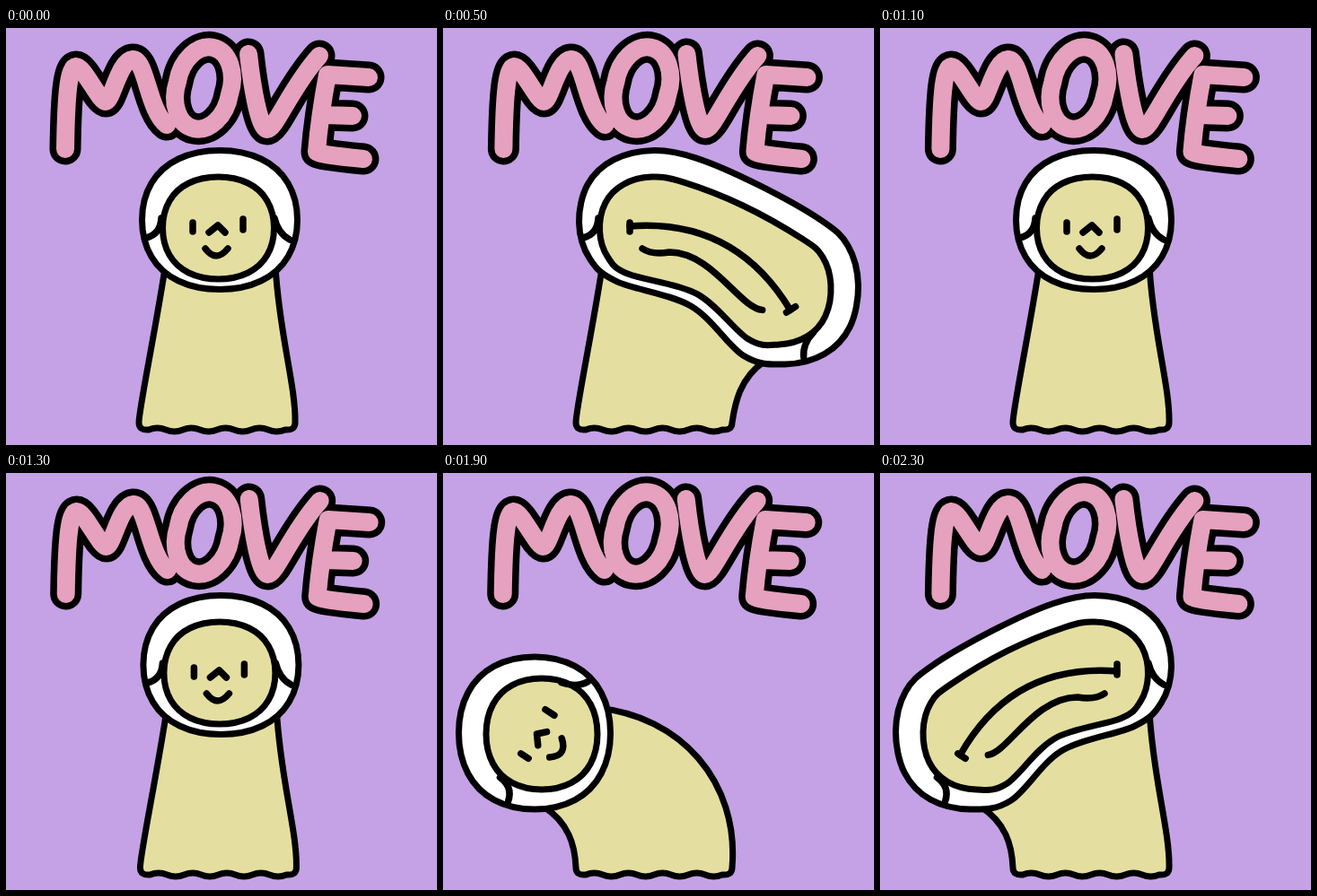
Recreate the animation shown at these times as an HTML page. Size 480 px wide and 465 px high, loop 2.4 s.

```html
<!DOCTYPE html>
<html lang="en">
<head>
<meta charset="utf-8">
<title>Move</title>
<style>
  html, body { margin: 0; width: 100%; height: 100%; overflow: hidden; background: #c4a2e5; }
  svg { display: block; width: 100vw; height: 100vh; }
  path { fill: none; stroke: #000; stroke-width: 7; stroke-linecap: round; stroke-linejoin: round; }
  #rim { stroke-width: 35; }
  #word { stroke: #e5a1bd; stroke-width: 20; }
  #body, #face { fill: #e4dfa0; }
  #head { fill: #fff; }
  #still, #moved, #trail { stroke-width: 7.5; }
</style>
</head>
<body>
<svg viewBox="0 0 480 465" role="img" aria-label="MOVE">
  <g id="lettering"><path id="rim"/><path id="word"/></g>
  <g id="figure">
    <path id="body"/><path id="head"/><path id="face"/>
    <path id="still"/><path id="moved"/><path id="trail"/>
  </g>
</svg>
<script>
const FRAME = 100, FRAMES = 24;
const LEANS = [{ start: 5, side: 1 }, { start: 18, side: -1 }], LEAN_STEPS = 6;
const TILT = 57;

const LETTERS = [
  "M66,135C67,70 70,44 78,43S104,82 111,82S126,36 141,35S158,92 179,108",
  "M191,60A30,42 14 1 1 249,74A30,42 14 1 1 191,60Z",
  "M270,29C274,65 282,113 291,113S318,65 349,31",
  "M404,55L358,52Q349,100 346,138Q346,141 398,146M353,97L386,98"
].join("");

// Body edges: straight, on the inside of a lean, on the outside of a lean
const LEFT = {
  straight: "L178,262C166,340 148,425 148,440",
  inner: "L112,372C140,390 147,415 148,440",
  outer: "L300,258C225,285 155,380 148,440"
};
const RIGHT = {
  straight: "C323,400 304,340 300,265",
  inner: "C325,420 330,390 359,371",
  outer: "C330,345 265,270 170,262"
};
const HEM = "Q148,449 159,448q9.5,-4 19,0" + "t19,0".repeat(7) + "Q322,449 322,440";

// Face parts around the nose tip; -1 is the left half, 1 the right half
const HALF = {
  "-1": "M-28,-3L-28,7M-63,-8Q-64,10 -80,14",
  "1": "M28,-7L28,5M63,-8Q67,9 80,16"
};
const MIDDLE = "M-10,8L0,0L8,8M-14,26Q-2,42 11,26";
const NOSE = { x: 236, y: 220 };

const upHead = { x: 238, y: 214, rx: 86.5, ry: 77.5 };
const upFace = { x: 236.5, y: 223, rx: 62, ry: 57 };
const leanHead = side => ({ x: 240 + 138 * side, y: 290, rx: 84.5, ry: 85 });
const leanFace = side => ({ x: 240 + 130 * side, y: 291, rx: 62, ry: 62 });
const leanNose = side => ({ x: 238 + 133.5 * side, y: 291 });

// Slightly squarish oval, sampled every 30 degrees
function arc(oval, from, count) {
  const soft = v => Math.sign(v) * Math.abs(v) ** 0.91;
  return Array.from({ length: count }, (_, i) => {
    const a = from + i * Math.PI / 6;
    return [oval.x + oval.rx * soft(Math.cos(a)), oval.y + oval.ry * soft(Math.sin(a))];
  });
}

// Outline of an oval dragged from a to b along a raised arc
function sweep(a, b, side) {
  const angle = Math.atan2(b.y - a.y, b.x - a.x), quarter = Math.PI / 2;
  const nx = -Math.sin(angle), ny = Math.cos(angle);
  const mx = (a.x + b.x) / 2 - 11 * side * nx, my = (a.y + b.y) / 2 - 11 * side * ny;
  const r = (a.ry + b.ry) / 2 - 4;
  return [
    ...arc(b, angle - quarter, 7), [mx + r * nx, my + r * ny],
    ...arc(a, angle + quarter, 7), [mx - r * nx, my - r * ny]
  ];
}

function smooth(points) {
  const n = points.length, at = i => points[(i + n) % n];
  const toward = (p, a, b) => [p[0] + (b[0] - a[0]) / 6, p[1] + (b[1] - a[1]) / 6];
  return "M" + points[0] + points.map((p, i) => {
    const next = at(i + 1);
    return `C${toward(p, at(i - 1), next)} ${toward(next, at(i + 2), p)} ${next}`;
  }).join("") + "Z";
}

function outline(up, lean, state, side) {
  if (state === "smear") return smooth(sweep(up, lean, side));
  return smooth(arc(state === "lean" ? lean : up, 0, 12));
}

function bodyPath(state, side) {
  const outer = state === "lean" ? "outer" : "straight";
  const edge = s => state === "up" ? "straight" : s === side ? "inner" : outer;
  const core = state === "up" ? upHead : leanHead(side);
  const start = state === "smear"
    ? { x: (core.x + upHead.x) / 2, y: (core.y + upHead.y) / 2 } : core;
  return `M${start.x},${start.y}` + LEFT[edge(-1)] + HEM + RIGHT[edge(1)] + "Z";
}

// Eye line and smile stretched from the upright face to the tilted one
function trailPath(side) {
  const from = (x, y) => `${NOSE.x + x * side},${NOSE.y + y}`;
  const nose = leanNose(side), a = TILT * Math.PI / 180;
  const to = (x, y) => {
    const across = x * Math.cos(a) - y * Math.sin(a), down = x * Math.sin(a) + y * Math.cos(a);
    return `${nose.x + across * side},${nose.y + down}`;
  };
  return `M${from(-28, 1)}Q${from(89, -8)} ${to(28, 0)}` +
    `M${from(-14, 26)}Q${from(-4, 33)} ${from(16, 30)}C${from(64, 30)} ${from(94, 92)} ${to(11, 26)}`;
}

function poseAt(step) {
  let pose = { state: "up", side: 1, since: step };
  for (const { start, side } of LEANS) {
    const k = step - start;
    if (k < 0) continue;
    if (k >= LEAN_STEPS) pose = { state: "up", side, since: k - LEAN_STEPS };
    else if (k === 0 || k === LEAN_STEPS - 1) pose = { state: "smear", side, since: 0 };
    else pose = { state: "lean", side, since: k - 1 };
  }
  return pose;
}

const el = id => document.getElementById(id);
const set = (id, d) => el(id).setAttribute("d", d);
const move = (id, transform) => el(id).setAttribute("transform", transform);
const boil = (id, count) => move(id, `translate(${count % 3 * 0.7} 0)`);

function draw(step) {
  const { state, side, since } = poseAt(step);
  const whole = HALF[-1] + HALF[1] + MIDDLE;
  const nose = leanNose(side);
  boil("lettering", step);
  boil("figure", since);
  set("body", bodyPath(state, side));
  set("head", outline(upHead, leanHead(side), state, side));
  set("face", outline(upFace, leanFace(side), state, side));
  set("still", { up: whole, smear: HALF[-side], lean: "" }[state]);
  set("moved", { up: "", smear: HALF[side], lean: whole }[state]);
  set("trail", state === "smear" ? trailPath(side) : "");
  move("moved", `translate(${nose.x} ${nose.y}) rotate(${TILT * side})`);
}

set("rim", LETTERS);
set("word", LETTERS);
move("still", `translate(${NOSE.x} ${NOSE.y})`);

const begin = performance.now();
let shown = -1;
function loop() {
  const step = Math.floor(Math.max(0, performance.now() - begin) / FRAME) % FRAMES;
  if (step !== shown) draw(shown = step);
  requestAnimationFrame(loop);
}
loop();
</script>
</body>
</html>
```
